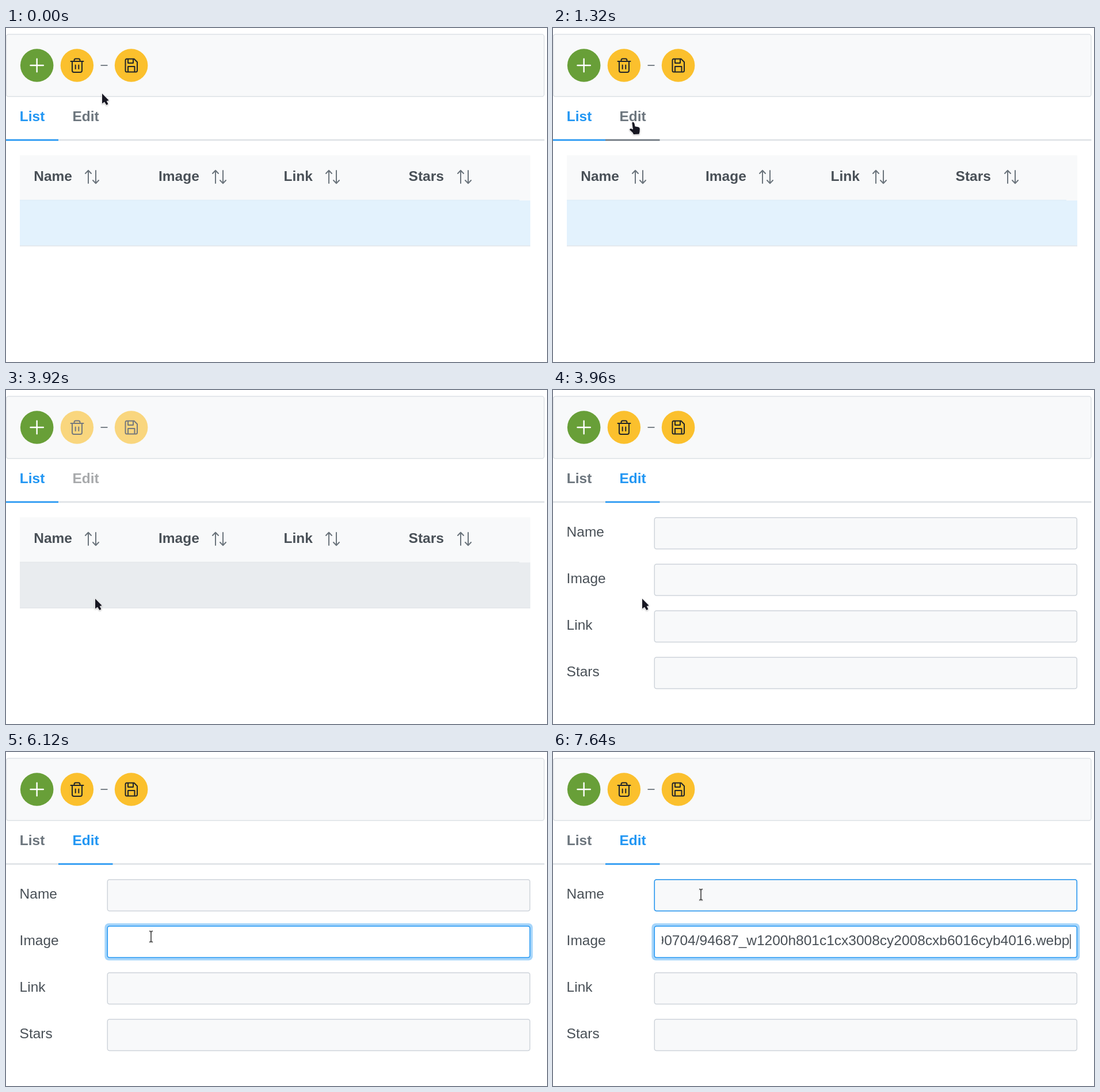
These frames come from a looping animation (940 px wide and 581 px high, 8 s). An HTML page:

```html
<!DOCTYPE html>
<html lang="en">
<head>
<meta charset="utf-8">
<title>Table editor</title>
<style>
  html, body { margin: 0; height: 100%; overflow: hidden; background: #fff; }
  svg { font: 24.5px "Liberation Sans", Arial, sans-serif; }
  body > svg { display: block; width: 100vw; height: 100vh; }
  text { fill: #495057; }
  .bold { font-weight: 700; }
  .icon { fill: none; stroke: #212529; stroke-width: 2; stroke-linejoin: round; stroke-linecap: round; }
  .sort { stroke: #6c757d; }
  .field { stroke: #ced4da; stroke-width: 1.5; fill: #f8f9fa; }
  .hot { stroke: #2196f3; stroke-width: 1.5; fill: none; }
  #cursor { filter: drop-shadow(0 1px 1px #0004); }
  #cursor path { fill: #171722; stroke: #fff; stroke-width: 1.6; paint-order: stroke; stroke-linejoin: round; }
  #cursor #beam { fill: none; stroke: #444; stroke-width: 1.5; }
</style>
</head>
<body>
<svg viewBox="0 0 940 581">
  <rect x="0.5" y="11" width="934.5" height="108.3" rx="4" fill="#f8f9fa" stroke="#dee2e6" stroke-width="1.5"/>
  <circle cx="53.7" cy="65" r="28.8" fill="#689f38"/>
  <path class="icon" d="M42.5 65h22.4M53.7 53.8v22.4" style="stroke:#fff;stroke-width:2.4"/>
  <path d="M164.5 65h12" stroke="#6c757d" stroke-width="1.8"/>
  <g id="actions">
    <circle cx="123.4" cy="65" r="28.7" fill="#fbc02d"/>
    <path class="icon" d="M112.5 58h22M115 58v16q0 3 3 3h11q3 0 3-3v-16M118.500 58v-2q0-2.500 2.500-2.500h5q2.500 0 2.500 2.500v2M120.700 64.500v6.500M126.300 64.500v6.500"/>
    <circle cx="217.600" cy="65" r="28.800" fill="#fbc02d"/>
    <path class="icon" d="M210 53.800h12.500l5.500 5.500v14.700q0 2.500-2.500 2.500h-15.500q-2.500 0-2.500-2.500v-17.700q0-2.500 2.500-2.500zM212 54v7h9v-7M212 76v-9h11.500v9"/>
  </g>

  <rect y="193.500" width="935.500" height="2.600" fill="#dee2e6"/>
  <rect id="tabLine" y="193.600" height="2.600" fill="#2196f3"/>
  <rect id="tabHover" x="91" y="193.600" width="94.500" height="2.600" fill="#6c757d"/>
  <text id="listTab" class="bold" x="23.800" y="162">List</text>
  <text id="editTab" class="bold" x="115.500" y="162">Edit</text>

  <g id="table">
    <rect x="24" y="221.500" width="887" height="79" fill="#f8f9fa"/>
    <rect id="headHover" x="24" y="221.500" width="217" height="78" fill="#e9ecef"/>
    <rect id="row" x="24" y="300" width="887" height="79.500"/>
    <rect id="rowTop" x="24" y="298.800" width="868" height="1.500"/>
    <rect x="24" y="378.300" width="887" height="1.500" fill="#e4e7ea"/>
    <g id="heads"></g>
  </g>

  <g id="form">
    <g id="fields"></g>
    <rect id="nameHot" class="hot" x="176.300" y="221.900" width="734" height="54.700" rx="3.500"/>
    <g id="focus">
      <rect x="171.400" y="297.900" width="743.800" height="64.700" rx="7" fill="#a6d5fa"/>
      <rect x="176.300" y="302.900" width="734" height="54.700" rx="3.500" fill="#fff"/>
    </g>
    <rect id="imageHot" class="hot" x="176.300" y="302.900" width="734" height="54.700" rx="3.500"/>
    <svg x="189" y="304" width="712" height="52">
      <text id="value" x="708.500" y="32" text-anchor="end">90704/94687_w1200h801c1cx3008cy2008cxb6016cyb4016.webp</text>
    </svg>
    <rect id="caret" y="317" width="1.600" height="25.500" fill="#495057"/>
  </g>

  <g id="cursor">
    <path id="arrow" d="M0 0v17.500l4-3 3.500 5.500 3-1.700-2.700-5.300 4-1z"/>
    <path id="hand" d="M-1.500 3q-.500-2.700 1.500-2.500 2 .300 2.500 3l1 4.800 5.500 1q2.800.700 2.800 3.700l-.300 5-1 3.500-9.500.500-1.500-3-5-4.500q-1-2.500 2-2.500l3.500 1.500z"/>
    <path id="beam" d="M-3-9.500q3 0 3 2 0-2 3-2M0-7.500v15M-3 9.500q3 0 3-2 0 2 3 2"/>
  </g>
</svg>
<script>
const LOOP = 8000, TICK = 40;
const el = Object.fromEntries([...document.querySelectorAll('[id]')].map(e => [e.id, e]));
const show = (e, on) => e.style.display = on ? '' : 'none';

// Table headings: name, text x, sort icon x
el.heads.innerHTML = [['Name', 48.2, 137], ['Image', 265, 358], ['Link', 482.6, 555], ['Stars', 699.6, 784]]
  .map(([name, x, ix]) => `<text class="bold" x="${x}" y="265.500">${name}</text>
    <path class="icon sort" d="M${ix + 1} 253l5-5.200 5 5.200M${ix + 6} 248v22M${ix + 14} 265l5 5.200 5-5.200M${ix + 19} 248v22"/>`).join('');

el.fields.innerHTML = ['Name', 'Image', 'Link', 'Stars']
  .map((name, i) => `<text x="23.600" y="${255 + 81 * i}">${name}</text>
    <rect class="field" x="176.300" y="${221.9 + 81 * i}" width="734" height="54.700" rx="3.500"/>`).join('');

// Pointer moves: first step, last step, end position
const start = [167, 114];
const moves = [
  [480, 800, 137, 172], [1200, 1320, 139, 163], [2440, 2720, 154, 369],
  [3640, 3720, 155, 363], [4400, 4600, 252, 321], [7280, 7640, 257, 248]
];

const progress = (t, a, b) => Math.min(1, Math.max(0, (t - a + TICK) / (b - a + TICK)));
const ease = p => p * p * (3 - 2 * p);

function pointer(t) {
  let [x, y] = start;
  for (const [a, b, tx, ty] of moves) {
    const p = ease(progress(t, a, b));
    x += (tx - x) * p;
    y += (ty - y) * p;
  }
  return [x, y];
}

function draw(t) {
  const [x, y] = pointer(t);
  const editing = t >= 3960;
  const disabled = t >= 3080 && !editing;
  const overTab = !editing && y > 121 && y < 197;
  const overHead = !editing && y > 221 && y < 299;
  const overRow = !editing && y >= 299 && t < 3920;
  const overField = editing && x > 176 && (y - 221 + 81) % 81 < 56;

  el.cursor.setAttribute('transform', `translate(${x} ${y})`);
  const hand = overTab || overHead || overRow;
  show(el.hand, hand);
  show(el.beam, overField);
  show(el.arrow, !hand && !overField);

  el.actions.style.opacity = disabled ? 0.6 : 1;
  el.tabLine.setAttribute('x', editing ? 91 : 0);
  el.tabLine.setAttribute('width', editing ? 94.5 : 91);
  el.listTab.style.fill = editing ? '#6c757d' : '#2196f3';
  el.editTab.style.fill = editing ? '#2196f3' : disabled ? '#a7a9ab' : '#6c757d';
  show(el.tabHover, overTab);

  show(el.table, !editing);
  show(el.headHover, overHead);
  el.row.style.fill = disabled ? '#e9ecef' : '#e3f2fd';
  el.rowTop.style.fill = disabled ? '#e4e8eb' : '#dfedf7';

  show(el.form, editing);
  el.imageHot.style.opacity = progress(t, 4440, 4600);
  el.nameHot.style.opacity = progress(t, 7480, 7640);
  el.focus.style.opacity = progress(t, 4880, 5080);
  const filled = t >= 6480;
  show(el.value, filled);
  show(el.caret, filled || (t >= 4880 && t < 6120));
  el.caret.setAttribute('x', filled ? 898 : 189.5);
}

function frame() {
  const t = performance.now() % LOOP;
  draw(Math.floor(t / TICK) * TICK);
  requestAnimationFrame(frame);
}
frame();
</script>
</body>
</html>
```
